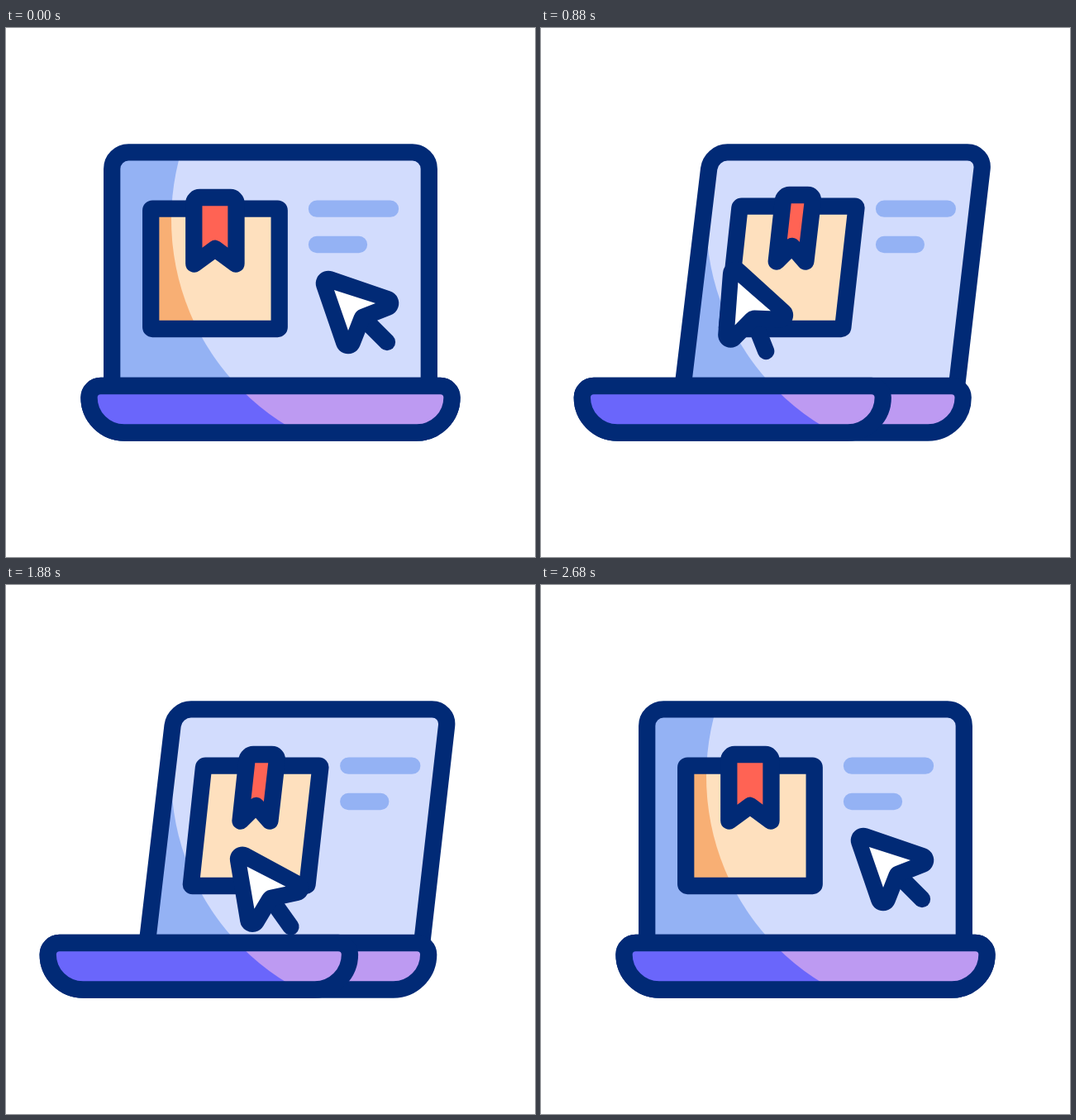
An HTML page that plays this animation: 640x640 px, repeating every 3000 ms.

```html
<!DOCTYPE html>
<html lang="en">
<head>
<meta charset="utf-8">
<title>Laptop order</title>
<style>
  html, body { margin: 0; width: 100%; height: 100%; overflow: hidden; background: #fff; }
  svg { display: block; width: 100vw; height: 100vh; }
  .line { fill: none; stroke: #012a76; stroke-width: 20.3; stroke-linecap: round; stroke-linejoin: round; }
  .bar { stroke: #94b2f4; }
</style>
</head>
<body>
<svg viewBox="0 0 640 640">
  <defs>
    <clipPath id="lidClip"><path class="lid"/></clipPath>
    <clipPath id="boxClip"><path class="box"/></clipPath>
    <clipPath id="frontClip"><path class="front"/></clipPath>
  </defs>

  <path class="lid" fill="#94b2f4"/>
  <g clip-path="url(#lidClip)"><circle cx="492" cy="232" r="292" fill="#d2dcfd"/></g>
  <path class="bar line" id="bars"/>
  <path class="lid line" style="stroke-linecap:butt"/>

  <path class="box" fill="#f8af74"/>
  <g clip-path="url(#boxClip)"><circle cx="492" cy="232" r="292" fill="#fee0be"/></g>
  <path class="box line"/>
  <path class="ribbon" fill="#ff6354"/>
  <path class="ribbon line"/>

  <g id="cursor">
    <path class="line" d="M430 349L461 380"/>
    <path d="M390 309L460 333L427 346L414 379Z" fill="#012a76" stroke="#012a76" stroke-width="30.5" stroke-linejoin="round"/>
    <path d="M397 317L447 333L429 340Q423.2 342.2 421 348L414 366Z" fill="#fff"/>
  </g>

  <path class="body" fill="#bd9af2"/>
  <path class="body line"/>
  <path class="front" fill="#6a66fb"/>
  <g clip-path="url(#frontClip)"><circle cx="492" cy="232" r="292" fill="#bd9af2"/></g>
  <path class="front line"/>
</svg>
<script>
const LOOP = 3000, STEP = 40;
const $ = s => document.querySelectorAll(s);
const mix = (a, b, k) => a + (b - a) * k;
const clamp = u => Math.min(1, Math.max(0, u));
const smooth = u => (u = clamp(u), u * u * (3 - 2 * u));
const setPath = (name, d) => $('.' + name).forEach(e => e.setAttribute('d', d));

function bezier(x1, y1, x2, y2) {
  const at = (a, b, s) => 3 * (1 - s) * (1 - s) * s * a + 3 * (1 - s) * s * s * b + s * s * s;
  return u => {
    if (u <= 0) return 0;
    if (u >= 1) return 1;
    let lo = 0, hi = 1;
    for (let i = 0; i < 24; i++) {
      const m = (lo + hi) / 2;
      if (at(x1, x2, m) < u) lo = m; else hi = m;
    }
    return at(y1, y2, lo);
  };
}
const turnEase = bezier(.27, .1, .25, 1);
const lidEase = bezier(.27, .1, .32, 1);
const baseEase = bezier(.3, .1, .36, 1);

// Points are [x, y, corner radius]; open paths keep their two ends sharp.
function rounded(pts, closed) {
  const n = pts.length;
  const toward = (a, b, dist) => {
    const k = dist / Math.hypot(b[0] - a[0], b[1] - a[1]);
    return [mix(a[0], b[0], k), mix(a[1], b[1], k)];
  };
  const f = p => p[0].toFixed(2) + ' ' + p[1].toFixed(2);
  let d = '';
  pts.forEach((p, i) => {
    const r = p[2] || 0, cmd = i ? 'L' : 'M';
    if (!r || (!closed && (i === 0 || i === n - 1))) { d += cmd + f(p); return; }
    const a = pts[(i + n - 1) % n], b = pts[(i + 1) % n];
    d += cmd + f(toward(p, a, r)) + 'C' + f(toward(p, a, r * .45)) + ' ' +
      f(toward(p, b, r * .45)) + ' ' + f(toward(p, b, r));
  });
  return d + (closed ? 'Z' : '');
}

function tray(left, right) {
  return `M${left + 14} 433H${right - 14}A14 14 0 0 1 ${right} 447` +
    `A42.5 42.5 0 0 1 ${right - 42.5} 489.5H${left + 42.5}` +
    `A42.5 42.5 0 0 1 ${left} 447A14 14 0 0 1 ${left + 14} 433Z`;
}

function drawLaptop(lid, base) {
  const x = (a, b) => mix(a, b, lid);
  setPath('lid', rounded([
    [x(128.2, 172), 433], [x(128.2, 206), 150.4, 20],
    [x(511.8, 536), 150.4, 20], [x(511.8, 503), 433]
  ]));
  const start = x(376, 415.3);
  setPath('bar', `M${start} 218.7H${x(465, 492)}M${start} 262H${x(427, 454)}`);
  const left = mix(100.5, 49.5, base);
  setPath('body', tray(left, mix(539.5, 510.5, base)));
  setPath('front', tray(left, mix(539.5, 413, base)));
}

function drawBox(turn, drop) {
  const x = (a, b) => mix(a, b, turn), top = 218.7 + drop;
  setPath('box', rounded([
    [x(175.2, 241), top, 2], [x(330.7, 382), top, 2],
    [x(330.7, 365.3), 364, 2], [x(175.2, 225), 364, 2]
  ], true));
  setPath('ribbon', rounded([
    [x(227.3, 294), 205 + drop, 7], [x(278.5, 330), 205 + drop, 7],
    [x(278.5, 320.5), 286 + drop, 1], [x(253, 304), 267 + drop],
    [x(227.3, 285), 286 + drop, 1]
  ], true));
}

function drawCursor(t, turn, press) {
  const go = smooth((t - 225) / 600), back = smooth((t - 1577) / 809);
  const dx = (-170 * go + 10 * press) * (1 - back);
  const dy = (82 * go * (1 - go) + 22 * press) * (1 - back) + 60 * back * (1 - back);
  const angle = 23.5 * turn * (1 - lidEase((t - 1560) / 840));
  $('#cursor')[0].setAttribute('transform', `translate(${dx} ${dy}) rotate(${angle} 425 340)`);
}

function draw(t) {
  const turn = turnEase((t - 215) / 740), u = (t - 1840) / 840;
  const lid = turn * (1 - lidEase(u)), base = turn * (1 - baseEase(u));
  const press = (1 - Math.cos(clamp((t - 880) / 640) * 3 * Math.PI)) / 2;
  const drop = (14.5 * press - 3 * smooth((t - 760) / 120)) * (1 - smooth((t - 1520) / 200));
  drawLaptop(lid, base);
  drawBox(lid, drop);
  drawCursor(t, turn, press);
}

const began = performance.now();
function tick() {
  const t = (performance.now() - began) % LOOP;
  draw(Math.floor(t / STEP) * STEP);
  requestAnimationFrame(tick);
}
tick();
</script>
</body>
</html>
```
